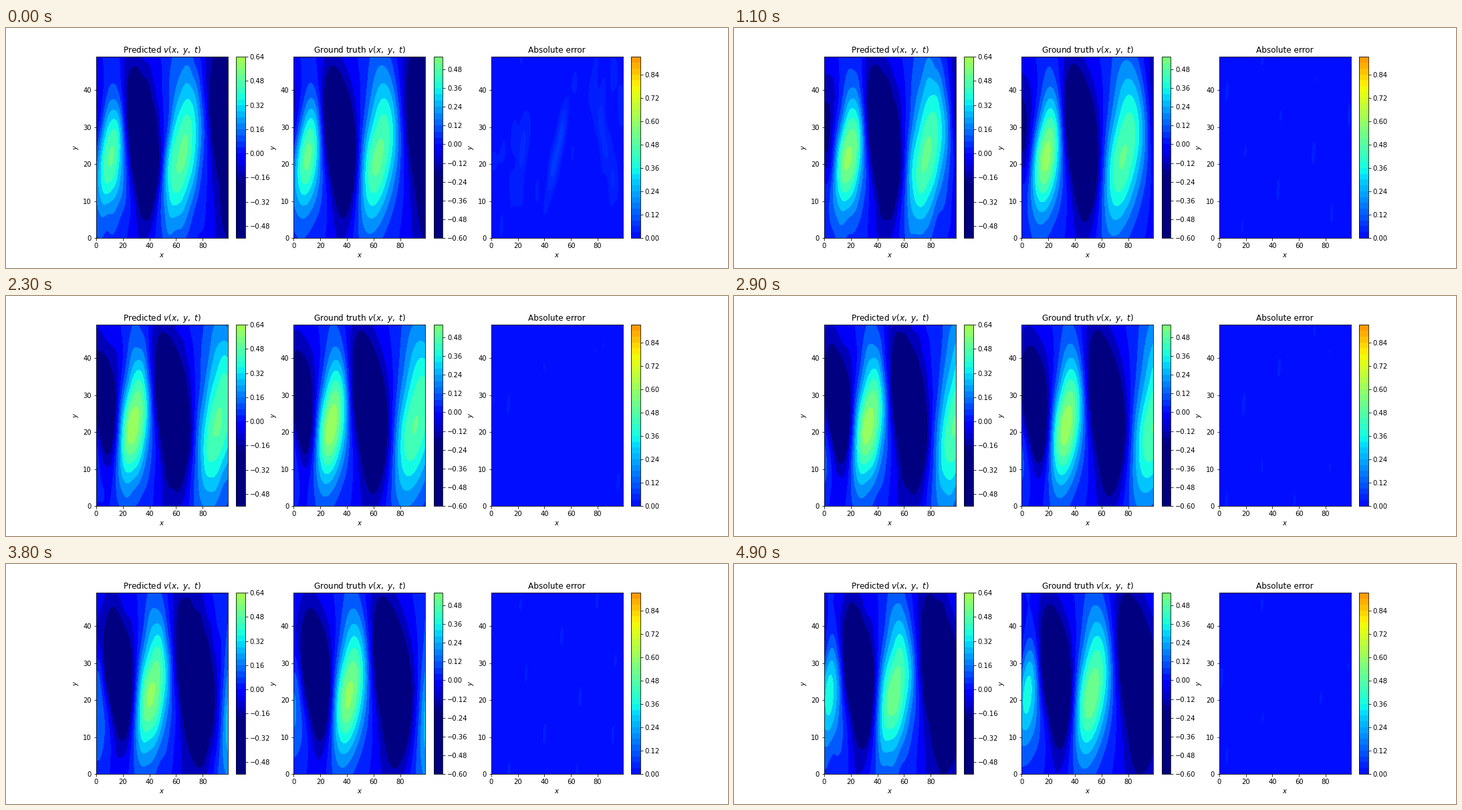
Recreate the animation shown at these times as a matplotlib script. Size 1080 by 360 pixels, loop 5000 ms.

```python
import numpy as np
import matplotlib.pyplot as plt
from matplotlib.animation import FuncAnimation

FRAMES, STEP = 50, 100          # frames per loop, ms per frame
PERIOD = 5.9                    # shedding period in seconds
W, H = 1080, 360
STYLE = dict(cmap="jet", vmin=-0.2, vmax=1.3)

plt.rcParams.update({"font.family": "DejaVu Sans", "font.size": 10})

X, Y = np.meshgrid(np.arange(100.0), np.arange(50.0))
ETA = Y - 24.5

# Time at which a phase front reaches each point
ARRIVAL = (0.10625 * (X - 22) - 0.000298 * (X - 22) * (X - 54)
           + 0.15 * (ETA / 15) ** 2)

# Strength of the vortices along and across the wake
ALONG = (0.48 + 0.14 * np.exp(-((X - 24) / 28) ** 2)) * (1 - 0.6 * np.exp(-X / 8))
SPREAD = 9 + 0.065 * X
AMP = ALONG * (0.92 * np.exp(-0.5 * (ETA / SPREAD) ** 2) + 0.08)
TILT = 0.3 * np.tanh(ETA / 12)
MEAN = -0.13 * np.exp(-X / 45) * ETA / 11 * np.exp(0.5 - 0.5 * (ETA / 11) ** 2)

# Early misfit: x, y, half width, half height, slant (dx/dy), size
BLOBS = [
    (22.5, 26, 4.5, 7, -0.15, 0.042),
    (49, 23, 3.2, 11, 0.55, -0.072),
    (85, 28, 4.5, 13, -0.42, 0.046),
    (1, 22, 5, 5, 0, -0.042),
    (18, 13, 4, 5, -0.75, 0.032),
    (98, 34, 4, 9, -0.2, -0.035),
    (47.5, 39, 2, 3, 0.8, 0.024),
]


def truth(t):
    theta = 2 * np.pi * (ARRIVAL - t) / PERIOD + np.pi / 2
    return AMP * (np.cos(theta) + TILT * np.sin(2 * theta)) + MEAN


def misfit(t):
    xs = X - 9 * t
    d = 0.009 * np.sin(0.42 * xs + 0.13 * Y + 1) * np.cos(0.16 * Y - 0.05 * X)
    d += 0.009 * np.sin(0.67 * xs - 0.21 * Y) * np.sin(0.11 * Y + 0.07 * X + 0.6)
    d += 0.007 * np.cos(0.27 * xs - 0.1 * Y + 2)
    d += 0.016 * np.exp(-(X / 4) ** 2 - ((Y - 27) / 4) ** 2)
    fade = np.exp(-t / 0.35)
    for x, y, w, h, slant, size in BLOBS:
        u = X - x - 6 * t - slant * (Y - y)
        d += fade * size * np.exp(-0.5 * (u / w) ** 2 - 0.5 * ((Y - y) / h) ** 2)
    return d


fig = plt.figure(figsize=(W / 72, H / 72), dpi=72, facecolor="white")
CELL = 0.775 / 3.4
BOTTOM, HEIGHT = 0.125, 0.755


def panel(i, title, levels, ticks):
    left = 0.125 + 1.2 * CELL * i
    ax = fig.add_axes([left, BOTTOM, 0.8 * CELL, HEIGHT])
    cax = fig.add_axes([left + 0.85 * CELL, BOTTOM, HEIGHT * H / 20 / W, HEIGHT])
    key = ax.contourf(X, Y, 0 * X + levels[1], levels=levels, **STYLE)
    bar = fig.colorbar(key, cax=cax, ticks=ticks, format="%.2f")
    bar.ax.set_yticks(ticks, [f"{v:.2f}".replace("-", "\u2212") for v in ticks])
    bar.ax.minorticks_off()
    key.remove()
    ax.set(title=title, xlabel="$x$", ylabel="$y$", xlim=(0, 99), ylim=(0, 49),
           xticks=range(0, 100, 20), yticks=range(0, 50, 10))
    return ax


axes = [
    panel(0, r"Predicted $v(x,\ y,\ t)$", np.linspace(-0.56, 0.64, 31),
          np.arange(-3, 5) * 0.16),
    panel(1, r"Ground truth $v(x,\ y,\ t)$", np.linspace(-0.60, 0.56, 30),
          np.arange(-5, 5) * 0.12),
    panel(2, "Absolute error", np.linspace(0, 0.93, 32), np.arange(8) * 0.12),
]

V_LEVELS = np.arange(-10, 11) * 0.08
E_LEVELS = np.arange(0, 11) * 0.02
fills = []


def draw(frame):
    t = frame * STEP / 1000
    v, d = truth(t), misfit(t)
    while fills:
        fills.pop().remove()
    for ax, z, levels in zip(axes, (v + d, v, abs(d)),
                             (V_LEVELS, V_LEVELS, E_LEVELS)):
        fills.append(ax.contourf(X, Y, z, levels=levels, **STYLE))
    return fills


anim = FuncAnimation(fig, draw, frames=FRAMES, interval=STEP,
                     repeat=True, repeat_delay=0, blit=False)
plt.show()
```
